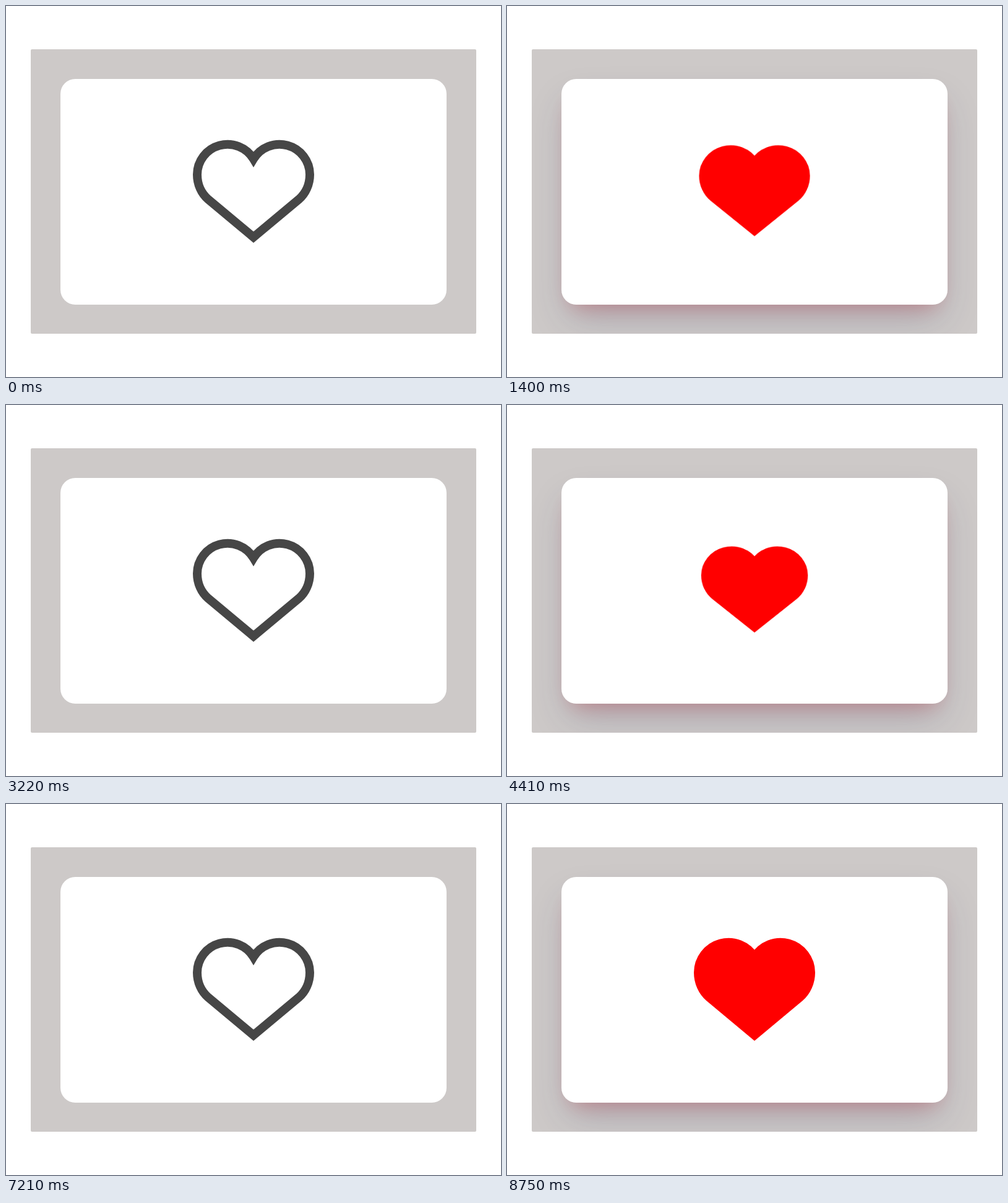
Animation, 800 px wide and 600 px high, one loop 9660 ms. Source, as an HTML page:

```html
<!DOCTYPE html>
<html lang="en">
<head>
<meta charset="utf-8">
<title>Like card</title>
<style>
  html, body {
    margin: 0;
    width: 100%;
    height: 100%;
    overflow: hidden;
    background: #fff;
  }
  .stage {
    position: relative;
    width: 800px;
    height: 600px;
  }
  .panel {
    position: absolute;
    left: 40px;
    top: 69.5px;
    width: 720px;
    height: 460.5px;
    border-radius: 2px;
    background: #cdc9c8;
    overflow: hidden;
  }
  .card, .glow {
    position: absolute;
    left: 48px;
    top: 48px;
    width: 623.5px;
    height: 365px;
    border-radius: 24px;
  }
  .card { background: #fff; }
  .glow {
    box-shadow: rgba(50, 50, 93, .25) 0 30px 60px -12px,
                rgba(255, 0, 0, .3) 0 18px 36px -18px;
  }
  svg {
    position: absolute;
    inset: 0;
  }
  .heart { stroke-width: 14; }
  .idle { fill: none; stroke: #464646; }
  .full {
    fill: #f00;
    stroke: #f00;
    transform-origin: 400px 290px;
    animation: grow 9660ms linear infinite;
  }
  .on  { animation: show 9660ms step-end infinite; }
  .off { animation: hide 9660ms step-end infinite; }

  /* Three likes per loop, each ended by a hard reset */
  @keyframes show {
    0%, 33.3333%, 74.6376% { opacity: 0; }
    13.0434%, 45.6521%, 85.5072% { opacity: 1; }
    100% { opacity: 1; }
  }
  @keyframes hide {
    0%, 33.3333%, 74.6376% { opacity: 1; }
    13.0434%, 45.6521%, 85.5072% { opacity: 0; }
    100% { opacity: 0; }
  }
  @keyframes grow {
    0%, 33.3333%, 74.6376% {
      transform: scale(.88, .8385);
      animation-timing-function: step-end;
    }
    13.0434%, 45.6521%, 85.5072% {
      transform: scale(.88, .8385);
      animation-timing-function: steps(7, end);
    }
    18.1159%, 50.7246%, 90.5797% {
      transform: none;
      animation-timing-function: step-end;
    }
    100% { transform: none; }
  }
</style>
</head>
<body>
<div class="stage">
  <div class="panel">
    <div class="glow on"></div>
    <div class="card"></div>
  </div>
  <svg width="800" height="600" viewBox="0 0 800 600">
    <defs>
      <path id="heart" d="M400 247.5A49 49 0 0 0 309 272.5A49 52.3 0 0 0 327 313L400 373.8L473 313A49 52.3 0 0 0 491 272.5A49 49 0 0 0 400 247.5Z"/>
    </defs>
    <g class="off"><use href="#heart" class="heart idle"/></g>
    <g class="on"><use href="#heart" class="heart full"/></g>
  </svg>
</div>
</body>
</html>
```
